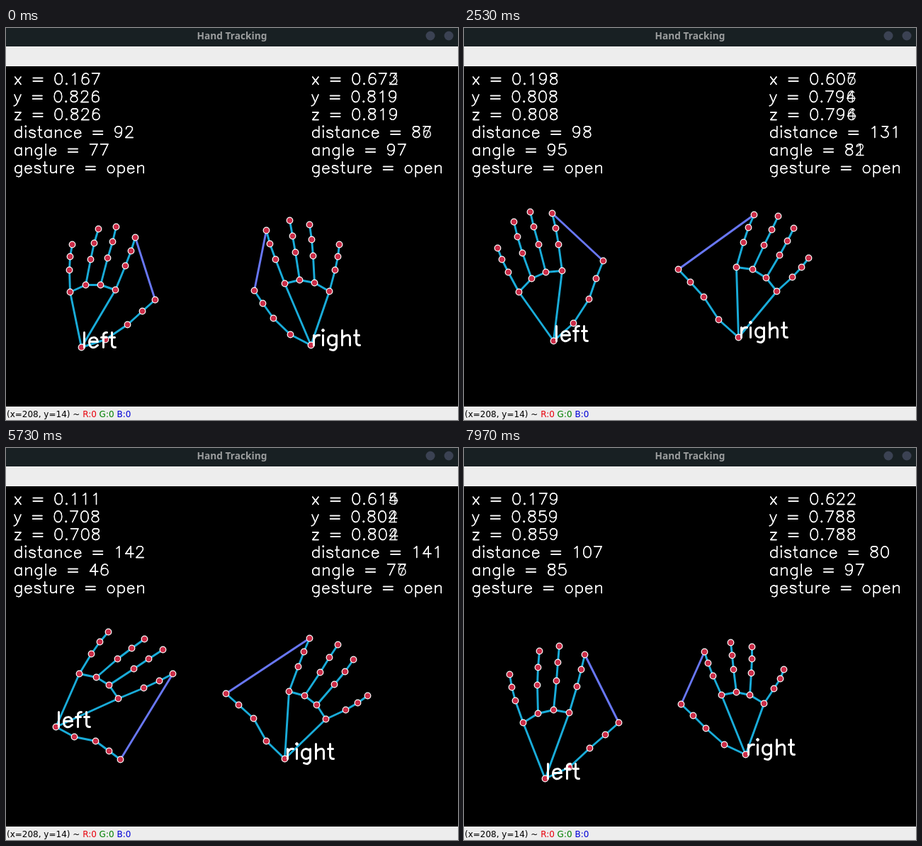
These frames come from a looping animation (638 px wide and 553 px high, 8000 ms). An HTML page with a canvas:

```html
<!DOCTYPE html>
<html lang="en">
<head>
<meta charset="utf-8">
<title>Hand Tracking</title>
<style>
html, body { margin: 0; width: 100%; height: 100%; overflow: hidden; background: #000; }
canvas { display: block; }
</style>
</head>
<body>
<canvas id="stage" width="638" height="553"></canvas>
<script>
const ctx = document.getElementById('stage').getContext('2d');
const LOOP = 8000, LAST = 7970, STEP = LAST / 136;
const VIEW = { top: 54, w: 640, h: 480 };

// Single-stroke lettering: advance width and path, y up from the baseline
const BOWL = 'M15 11C9 17 3 13 3 7S9 -3 15 3';
const ARCH = 'M4 10C8 15 15 16 15 10V0';
const GLYPHS = {
  ' ': [16, ''],
  '=': [26, 'M4 12H22M4 6H22'],
  '.': [10, 'M5 2 4 1 5 0 6 1Z'],
  0: [20, 'M10 21C.7 21 .7 0 10 0S19.3 21 10 21'],
  1: [20, 'M6 17 8 18 11 21V0'],
  2: [20, 'M4 16C4 23 16 23 16 16C16 12 13 10 3 0H17'],
  3: [20, 'M5 21H16L10 13C19 13.5 19 0 9.5 0Q5 0 3 4'],
  4: [20, 'M13 0V21L3 7H18'],
  5: [20, 'M15 21H5L4 12C7 15 17 16 17 7C17 -1 6 -2 3 4'],
  6: [20, 'M16 18C14 22 4 24 4 7C4 -2.3 17 -2.3 17 6.5S4 15.5 4 7'],
  7: [20, 'M3 21H17L7 0'],
  8: [20, 'M10 21C2 21 2 14 9 12.5C19 10 18.5 0 10 0S1 10 11 12.5C18 14 18 21 10 21'],
  9: [20, 'M4 3C6 -1 16 -3 16 14C16 23.3 3 23.3 3 14.5S16 5.5 16 14'],
  a: [19, BOWL + 'M15 14V0'],
  c: [18, BOWL],
  d: [19, BOWL + 'M15 21V0'],
  e: [18, 'M3 8H15C15 16 3 16 3 7C3 0 9 -3 15 3'],
  f: [12, 'M10 21Q5 21 5 17V0M2 14H9'],
  g: [19, BOWL + 'M15 14V-1C15 -7 10 -8 6 -6'],
  h: [19, 'M4 21V0' + ARCH],
  i: [8, 'M3 21 4 20 5 21 4 22ZM4 14V0'],
  l: [8, 'M4 21V0'],
  n: [19, 'M4 14V0' + ARCH],
  o: [19, 'M9.5 14C1 14 1 0 9.5 0S18 14 9.5 14'],
  p: [19, 'M4 14V-7M4 11C10 17 16 13 16 7S10 -3 4 3'],
  r: [13, 'M4 14V0M4 8Q6 15 12 14'],
  s: [17, 'M14 11C12 15 3 15 3 11C3 7 14 9 14 3.5C14 -1 5 -1 3 3'],
  t: [12, 'M5 21V4Q5.5 -.5 10 0M2 14H9'],
  u: [19, 'M4 14V4C4 -1 11 -1 15 4M15 14V0'],
  x: [17, 'M3 14 14 0M14 14 3 0'],
  y: [16, 'M2 14 8 0M14 14 8 0Q5 -7 1 -7'],
  z: [17, 'M3 14H14L3 0H14']
};
for (const g of Object.values(GLYPHS)) g[1] = new Path2D(g[1]);

// Pose: time, wrist x, y (0..1), palm length and angle, finger length,
// index and pinky angles, thumb reach and angle.
// Angles are in degrees from upright towards the thumb.
const upright = [99, 19.5, 82, 11.3, -16.3, 128, 53];
const HANDS = [
  { name: 'left', side: 1, textX: 10, poses: [
    [0, .167, .826, 94, 30.6, 79, 20.7, 2.6, 124, 57.2],
    [1000, .203, .797, 92, 24.3, 82, 20, -16.3, 128, 56.2],
    [2530, .198, .808, 100, 6.9, 82, -9.8, -25.5, 133, 31.8],
    [3670, .184, .855, 104, 20.2, 77, 8.2, -5.1, 130, 50.3],
    [5070, .177, .847, ...upright],
    [5730, .106, .698, 97, 68.7, 85, 69.4, 39.1, 100, 121.5],
    [6400, .177, .83, ...upright],
    [7130, .18, .836, ...upright],
    [LAST, .179, .859, 99, 20.6, 85, 14.4, -15.3, 131, 52.8]
  ] },
  { name: 'right', side: -1, textX: 430, poses: [
    [0, .673, .819, 94.5, 23, 79.4, 19.1, -11.8, 111, 46.1],
    [1000, .636, .794, 96, 23.4, 80, 10.8, -31.4, 125, 60.4],
    [2530, .606, .796, 99, 1.7, 78, -18.7, -43.3, 128, 41.5],
    [3670, .759, .619, 101, 86, 89, 85.5, 38.8, 118, 130.9],
    [5730, .612, .806, 95.5, -6, 80, -23.7, -63.4, 124, 39.7],
    [7130, .622, .778, 78.5, 34.1, 50, 20, -15, 85, 25.7],
    [LAST, .622, .788, 90, 22.3, 66, 21.6, -31, 115, 52]
  ] }
];

// Index to pinky: length against the index, place in the fan
const LENGTHS = [1, 1.07, 1.03, 0.84];
const FAN = [1, 0.7, 0.55, 0];
// Offsets of a closed finger's joints from its knuckle
const FOLD = [[12, -15], [12, 11], [2, 12]];

const mix = (a, b, k) => a + (b - a) * k;
const add = (p, q) => [p[0] + q[0], p[1] + q[1]];
const mixPoint = (p, q, k) => p.map((v, i) => mix(v, q[i], k));

function polar(len, deg) {
  const a = deg * Math.PI / 180;
  return [len * Math.sin(a), -len * Math.cos(a)];
}

// Point at part k of a-b, pushed sideways by bow
function along(a, b, k, bow = 0) {
  const dx = b[0] - a[0], dy = b[1] - a[1];
  return [a[0] + dx * k + dy * bow, a[1] + dy * k - dx * bow];
}

function poseAt(poses, t) {
  let i = 0;
  while (i < poses.length - 2 && t >= poses[i + 1][0]) i++;
  const a = poses[i], b = poses[i + 1];
  const k = Math.min(1, (t - a[0]) / (b[0] - a[0]));
  return a.map((v, n) => mix(v, b[n], k));
}

function handAt({ poses, side }, t) {
  const [, x, y, palm, aim, finger, index, pinky, reach, thumb] = poseAt(poses, t);
  const curl = Math.min(1, Math.max(0, (66 - finger) / 16));
  const wrist = [0, 0];

  const bend = 22.3 - 0.58 * (thumb - aim);
  const tip = polar(reach, thumb);
  const mid = polar(reach * (0.585 + 0.27 * curl), thumb + bend);
  const pts = [wrist, along(wrist, mid, 0.49, -0.07), mid,
    along(mid, tip, 0.53, -0.4 * curl), tip];

  const first = polar(palm, aim), last = polar(palm * 0.85, aim - 42);
  const arch = -0.13 * (1 - 0.7 * curl);
  const knuckles = [first, along(first, last, 0.32, arch), along(first, last, 0.65, arch), last];
  knuckles.forEach((knuckle, i) => {
    const end = add(knuckle, polar(finger * LENGTHS[i], mix(pinky, index, FAN[i])));
    const bow = 0.015 * (i - 1);
    const open = [along(knuckle, end, 0.46, bow), along(knuckle, end, 0.745, bow), end];
    pts.push(knuckle, ...open.map((p, j) => mixPoint(p, add(knuckle, FOLD[j]), curl)));
  });

  const [kx, ky] = knuckles[1];
  const base = [x * VIEW.w - 1, y * VIEW.h + VIEW.top - 0.5];
  return {
    x, y,
    distance: Math.hypot(tip[0] - pts[8][0], tip[1] - pts[8][1]),
    angle: Math.atan2(-ky / VIEW.h, side * kx / VIEW.w) * 180 / Math.PI,
    gesture: curl > 0.5 ? 'fist' : 'open',
    pts: pts.map(p => add(base, [side * p[0], p[1]]).map(Math.round))
  };
}

function strokeText(text, x, y, size, width) {
  ctx.save();
  ctx.translate(x, y);
  ctx.scale(size, -size);
  ctx.lineWidth = width / size;
  ctx.strokeStyle = '#fff';
  for (const ch of text) {
    const [advance, path] = GLYPHS[ch];
    ctx.stroke(path);
    ctx.translate(advance, 0);
  }
  ctx.restore();
}

function drawReadings({ x, y, distance, angle, gesture }, left) {
  const short = v => String(+v.toFixed(3));
  const rows = [
    'x = ' + short(x), 'y = ' + short(y), 'z = ' + short(y),
    'distance = ' + Math.floor(distance), 'angle = ' + Math.round(angle),
    'gesture = ' + gesture
  ];
  rows.forEach((row, i) => strokeText(row, left, 79 + 25 * i, 0.75, 1.35));
}

function line(pts, color) {
  ctx.strokeStyle = color;
  ctx.lineWidth = 2.9;
  ctx.beginPath();
  pts.forEach(p => ctx.lineTo(p[0], p[1]));
  ctx.stroke();
}

function disc(x, y, r, color) {
  ctx.fillStyle = color;
  ctx.beginPath();
  ctx.arc(x, y, r, 0, 2 * Math.PI);
  ctx.fill();
}

const BONES = [[0, 1, 2, 3, 4], [0, 5, 6, 7, 8], [5, 9, 10, 11, 12],
  [9, 13, 14, 15, 16], [13, 17, 18, 19, 20], [0, 17]];

function drawHand(hand, t) {
  const now = handAt(hand, t), { pts } = now;
  ctx.save();
  ctx.translate(0.5, 0.5);
  for (const bone of BONES) line(bone.map(n => pts[n]), '#19acd9');
  line([pts[4], pts[8]], '#6877f5');
  for (const [x, y] of pts) {
    disc(x, y, 4.9, '#fff');
    disc(x, y, 3.7, '#cb2d48');
  }
  strokeText(hand.name, ...pts[0], 1, 3);
  // The right readings are printed twice, slightly apart in time
  drawReadings(now, hand.textX);
  drawReadings(hand.side < 0 ? handAt(hand, t + 20) : now, hand.textX);
  ctx.restore();
}

function drawWindow() {
  ctx.fillStyle = '#182023';
  ctx.fillRect(0, 0, 638, 26);
  ctx.fillStyle = '#ededed';
  ctx.fillRect(0, 26, 638, 28);
  ctx.fillRect(0, 534, 638, 19);

  ctx.fillStyle = '#9b9d9e';
  ctx.font = 'bold 13.7px "Noto Sans", "Open Sans", sans-serif';
  ctx.textAlign = 'center';
  ctx.fillText('Hand Tracking', 319, 16);
  disc(599, 11, 6.5, '#3b4253');
  disc(625, 11, 6.5, '#3b4253');

  ctx.font = '12px "DejaVu Sans", sans-serif';
  ctx.textAlign = 'left';
  let x = 1;
  const status = [['(x=208, y=14) ~ ', '#000'], ['R:0 ', '#e8000b'],
    ['G:0 ', '#008000'], ['B:0', '#0000d8']];
  for (const [text, color] of status) {
    ctx.fillStyle = color;
    ctx.fillText(text, x, 549);
    x += ctx.measureText(text).width;
  }
}

function draw() {
  // The camera feed advances in steps
  const t = Math.floor((performance.now() % LOOP) / STEP + 0.01) * STEP;
  ctx.fillStyle = '#000';
  ctx.fillRect(0, 0, 638, 553);
  ctx.lineCap = ctx.lineJoin = 'round';
  for (const hand of HANDS) drawHand(hand, t);
  drawWindow();
  requestAnimationFrame(draw);
}
draw();
</script>
</body>
</html>
```
